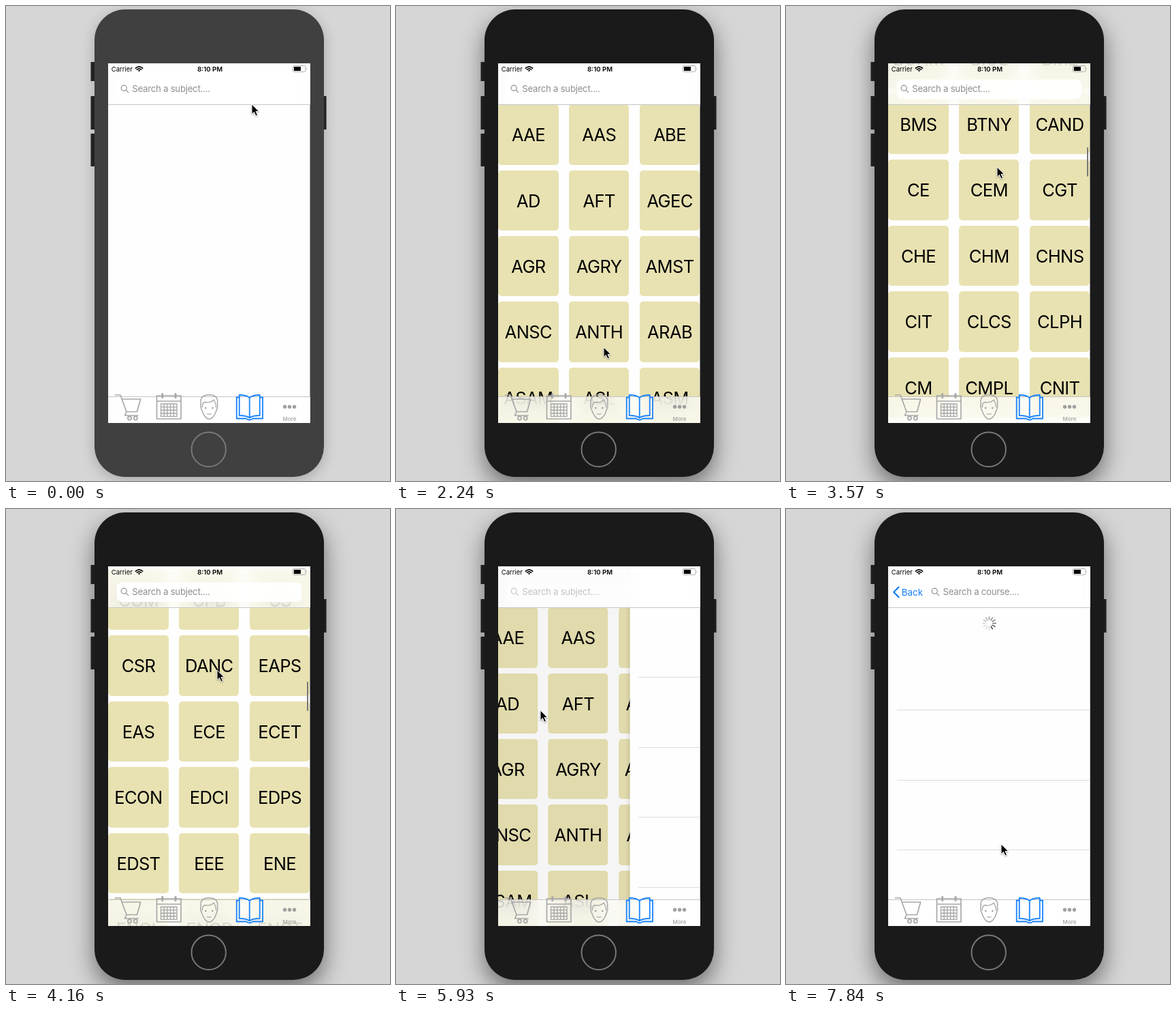
These frames come from a looping animation (564 px wide and 696 px high, 7.99 s). An HTML page:

```html
<!DOCTYPE html>
<html lang="en">
<head>
<meta charset="utf-8">
<title>Subject search</title>
<style>
html, body { margin: 0; width: 100%; height: 100%; overflow: hidden; background: #d6d6d6; }
#stage { position: relative; width: 564px; height: 696px; overflow: hidden; font-family: Inter, sans-serif; }
#stage div, #stage svg { position: absolute; }
.full { left: 0; top: 0; width: 564px; height: 696px; }
#phone { left: 129.5px; top: 5px; width: 337px; height: 685px; border-radius: 45px;
  background: #1a1a1a; box-shadow: 0 14px 34px rgba(0,0,0,.5); }
#phone.idle { background: #404040; box-shadow: 0 5px 20px rgba(0,0,0,.22); }
#screen { background: #fefefe; clip-path: inset(84px 117.5px 85px 150px); }
.cell { width: 88.3px; height: 88.4px; border-radius: 5px; background: #e8e2b2; color: #000;
  font-size: 25.5px; letter-spacing: -.6px; line-height: 89px; text-align: center; }
#dim { background: #000; }
#page { left: 150px; top: 84px; width: 297px; height: 527px; background: #fefefe; box-shadow: -2px 0 6px rgba(0,0,0,.14); }
#page svg { left: 0; top: 0; }
.bar { left: 150px; width: 297px; box-sizing: border-box; background: rgba(255,255,255,.7);
  -webkit-backdrop-filter: blur(12px); backdrop-filter: blur(12px); }
#nav { top: 84px; height: 61px; border-bottom: 1px solid #c6c6c6; }
#tabs { top: 572px; height: 39px; border-top: 1px solid #c4c4c4; }
#thumb { left: 442px; width: 2.4px; border-radius: 2px; background: #777; }
text { font-family: Inter, sans-serif; }
.hint { font-size: 13.2px; letter-spacing: -.25px; fill: #8e8e93; }
.line { fill: none; stroke-linejoin: round; stroke-linecap: round; }
</style>
</head>
<body>
<div id="stage">
  <svg class="full" viewBox="0 0 564 696" fill="#262626">
    <path d="M124.500 82h7v28h-7zM124.500 132h7v49h-7zM124.500 187h7v48h-7zM464 132h6.500v49h-6.500z"/>
  </svg>
  <div id="phone"></div>
  <svg class="full" viewBox="0 0 564 696">
    <circle cx="297.700" cy="649.800" r="25.200" fill="none" stroke="#777" stroke-width="2"/>
  </svg>
  <div id="screen" class="full">
    <div id="old" class="full"><div id="grid"></div><div id="thumb"></div></div>
    <div id="dim" class="full"></div>
    <div id="page"><svg id="rows" width="297" height="527" viewBox="0 0 297 527"></svg></div>
    <div id="nav" class="bar"></div>
    <div id="tabs" class="bar"></div>
    <svg class="full" viewBox="0 0 564 696">
      <defs>
        <g id="lens" class="line" stroke="#8e8e93" stroke-width="1.200">
          <circle cx="173.200" cy="120.200" r="4"/><path d="M176.200 123.200l3.500 3.500"/>
        </g>
      </defs>
      <text x="154.700" y="96" font-size="9.500">Carrier</text>
      <g class="line" stroke="#000" stroke-width="1.700" stroke-linecap="butt">
        <path d="M190.400 91.200q5.100-4.600 10.200 0M192.400 93.200q3.100-2.800 6.200 0"/>
      </g>
      <path d="M193.800 94.400q1.700-1.300 3.400 0l-1.700 1.900z"/>
      <text x="299.500" y="95.800" font-size="9.600" font-weight="600" text-anchor="middle">8:10 PM</text>
      <rect x="421.400" y="87.600" width="18.600" height="8.800" rx="1.800" fill="none" stroke="#999" stroke-width=".8"/>
      <rect x="422.900" y="89" width="10" height="6"/>
      <path d="M441 90.500q1.300 1.500 0 3z" fill="#999"/>
      <g id="subject">
        <rect x="162.500" y="107.800" width="271.700" height="28.200" rx="8" fill="#fff" fill-opacity=".93"/>
        <use href="#lens"/>
        <text id="hint" class="hint" x="185.300" y="126">Search a subject....</text>
        <text id="typed" x="186.800" y="126.200" font-size="13.200">A</text>
        <rect id="caret" y="113" width="1.400" height="17" fill="#4a6ee8"/>
        <g id="clear">
          <circle cx="422" cy="121.800" r="6.400" fill="#8e8e93"/>
          <path d="M419.700 119.500l4.600 4.600m0-4.600l-4.600 4.600" stroke="#fff" stroke-width="1.200"/>
        </g>
      </g>
      <g id="course">
        <path class="line" d="M165.500 114.500l-7.300 7.300 7.300 7.300" stroke="#157efb" stroke-width="2.200"/>
        <text x="169.800" y="126.500" font-size="13.400" fill="#157efb">Back</text>
        <use href="#lens" x="45"/>
        <text class="hint" x="230.500" y="126">Search a course....</text>
      </g>
      <g class="line" stroke="#a8a8a8" stroke-width="1.700">
        <path d="M160.500 570h7.500l9 24.500h15.500l5.200-18.500h-27M177 594.500l-2.500 5.500h19.500"/>
        <circle cx="181.500" cy="604" r="2.600"/><circle cx="190.300" cy="604" r="2.600"/>
        <path d="M221.500 571h35.500v34h-35.500zM221.500 579h35.500"/>
        <path id="cal" stroke-width="1.400"/>
        <path d="M229.700 568.500v5M249 568.500v5" stroke-width="3"/>
        <path d="M286.300 582C284.500 574 290 569.800 298.300 569.800S312 574 310.500 582C312 588 309.500 590.500 308.500 594 307 599.500 302 605.300 298.300 605.300S290 599.500 288.300 594C287 590.500 284.500 588 286.300 582z" stroke-width="1.500"/>
        <path d="M288.300 588c0-5 1.500-7 4-7.500 5 1 10-.5 13-3.500 1.500 4 3.500 5 3.300 11M295.500 597.500q2.800 1.500 5.600 0" stroke-width="1.300"/>
      </g>
      <g fill="#a0a0a0">
        <circle cx="293.300" cy="589" r="1.300"/><circle cx="303.300" cy="589" r="1.300"/>
        <circle cx="409.500" cy="587.300" r="2.700"/><circle cx="416.500" cy="587.300" r="2.700"/><circle cx="423.500" cy="587.300" r="2.700"/>
        <text x="416.500" y="608" font-size="8" font-weight="500" text-anchor="middle">More</text>
      </g>
      <path class="line" stroke="#1782fc" stroke-width="1.800" d="M357.700 574c-4-3.500-9-4-15-4v30c6 0 11 .5 15 3.500 4-3 9-3.500 15-3.500v-30c-6 0-11 .5-15 4zv29.500M342.700 573.500h-4v31h14.500q1.500 2 4.500 2t4.500-2h14.800v-31h-4.300"/>
    </svg>
  </div>
  <svg class="full" viewBox="0 0 564 696">
    <g id="cursor" style="filter:drop-shadow(0 1px 1px rgba(0,0,0,.35))">
      <path d="M0 0v14.500l3.400-3.100 2.500 5.600 2.600-1.100-2.500-5.500h4.600z" fill="#000" stroke="#fff" stroke-width="1"/>
    </g>
  </svg>
</div>
<script>
const $ = id => document.getElementById(id);
const LOOP = 7990, STEP = 147.9;
const subjects = ('AAE AAS ABE AD AFT AGEC AGR AGRY AMST ANSC ANTH ARAB ASAM ASL ASM ASTR AT BAND BCHM BIOL BME ' +
  'BMS BTNY CAND CE CEM CGT CHE CHM CHNS CIT CLCS CLPH CM CMPL CNIT COM CPB CS CSR DANC EAPS EAS ECE ECET ' +
  'ECON EDCI EDPS EDST EEE ENE ENGL ENGR ENGT ENTM ENTR EPCS').split(' ');

subjects.forEach((name, i) => {
  const cell = document.createElement('div');
  cell.className = 'cell';
  cell.textContent = name;
  cell.style.left = 150.3 + i % 3 * 103.8 + 'px';
  cell.style.top = 144.2 + Math.floor(i / 3) * 96.4 + 'px';
  $('grid').append(cell);
});

let calendar = '';
for (let i = 0; i < 6; i++) calendar += `M${227.5 + i * 4.7} 583v18.500`;
for (let i = 0; i < 5; i++) calendar += `M227.500 ${583 + i * 4.6}h23.500`;
$('cal').setAttribute('d', calendar);

const svg = (parent, tag, attrs) => {
  const node = document.createElementNS('http://www.w3.org/2000/svg', tag);
  for (const key in attrs) node.setAttribute(key, attrs[key]);
  return parent.appendChild(node);
};
const lines = svg($('rows'), 'g', {});
for (let i = 0; i < 4; i++)
  svg(lines, 'rect', { x: 12.700, y: 162 + Math.round(i * 102.5), width: 285, height: 1, fill: '#dcdcdc' });
const ticks = Array.from({ length: 12 }, (_, i) => svg($('rows'), 'path', {
  d: 'M0-5.200V-9.600', transform: `translate(148.500 83.500) rotate(${i * 30})`,
  stroke: '#3c3c46', 'stroke-width': 1.6, 'stroke-linecap': 'round'
}));

// Tracks hold [step, value...] and are read linearly.
const tracks = {
  cursor: [[0, 361, 144], [5, 342, 119], [11, 342, 119], [15, 305, 500], [17, 303, 500], [20, 303, 457],
    [23, 308, 250], [24, 310, 236], [28, 310, 236], [31, 288, 460], [33, 280, 477], [35, 268, 440],
    [38, 212, 295], [44, 212, 295], [47, 300, 340], [51, 316, 491]],
  scroll: [[17, 0], [20, 44], [21, 90], [22, 200], [23, 430], [24, 690], [25, 900], [26, 1050], [27, 1150],
    [28, 1212], [29, 1180], [30, 960], [31, 520], [32, 90], [33, -20], [35, -8], [36, -3], [38, 0]],
  thumb: [[20, 0], [21, 1], [35, 1], [38, 0]],
  push: [[39, 0], [40, .346], [41, .74], [42, .94], [43, 1]],
  pull: [[47, 0], [51, 60], [52, 48]]
};
function read(name, step) {
  const keys = tracks[name];
  const next = keys.findIndex(key => key[0] > step);
  if (next < 0) return keys[keys.length - 1].slice(1);
  if (next === 0) return keys[0].slice(1);
  const a = keys[next - 1], b = keys[next];
  const mix = (step - a[0]) / (b[0] - a[0]);
  return a.slice(1).map((v, i) => v + (b[i + 1] - v) * mix);
}
const show = (id, on) => { $(id).style.opacity = +on; };

function draw(time) {
  const k = Math.min(53, Math.floor(time % LOOP / STEP));
  const [x, y] = read('cursor', k), [scroll] = read('scroll', k);
  const [push] = read('push', k), [pull] = read('pull', k);
  const typing = k >= 8 && k < 10;

  $('phone').className = k < 1 ? 'idle' : '';
  $('cursor').setAttribute('transform', `translate(${x} ${y})`);
  show('grid', k >= 8);
  show('hint', !typing);
  show('typed', typing);
  show('clear', typing);
  show('caret', k >= 4 && k < 12);
  $('caret').setAttribute('x', typing ? 194.5 : 185.2);

  $('grid').style.transform = `translateY(${-scroll}px)`;
  $('thumb').style.top = 146 + Math.max(0, scroll) * .0883 + 'px';
  $('thumb').style.height = 43 + Math.min(0, scroll) + 'px';
  show('thumb', read('thumb', k)[0]);

  $('old').style.transform = `translateX(${-89 * push}px)`;
  show('dim', push * .1);
  $('page').style.transform = `translateX(${296 * (1 - push)}px)`;
  show('page', push > 0);
  show('subject', Math.max(0, 1 - push * 1.4));
  show('course', Math.max(0, push * 2 - 1));

  lines.setAttribute('transform', `translate(0 ${pull})`);
  const head = (k - 53) * 2 + 5 + 120;
  ticks.forEach((tick, i) => {
    const age = (head - i) % 12;
    const alpha = k < 51 ? +(i < pull / 4) * .45 : Math.max(.16, .9 - age * .085);
    tick.setAttribute('opacity', alpha);
  });
}

const start = performance.now();
function frame() {
  draw(performance.now() - start);
  requestAnimationFrame(frame);
}
frame();
</script>
</body>
</html>
```
